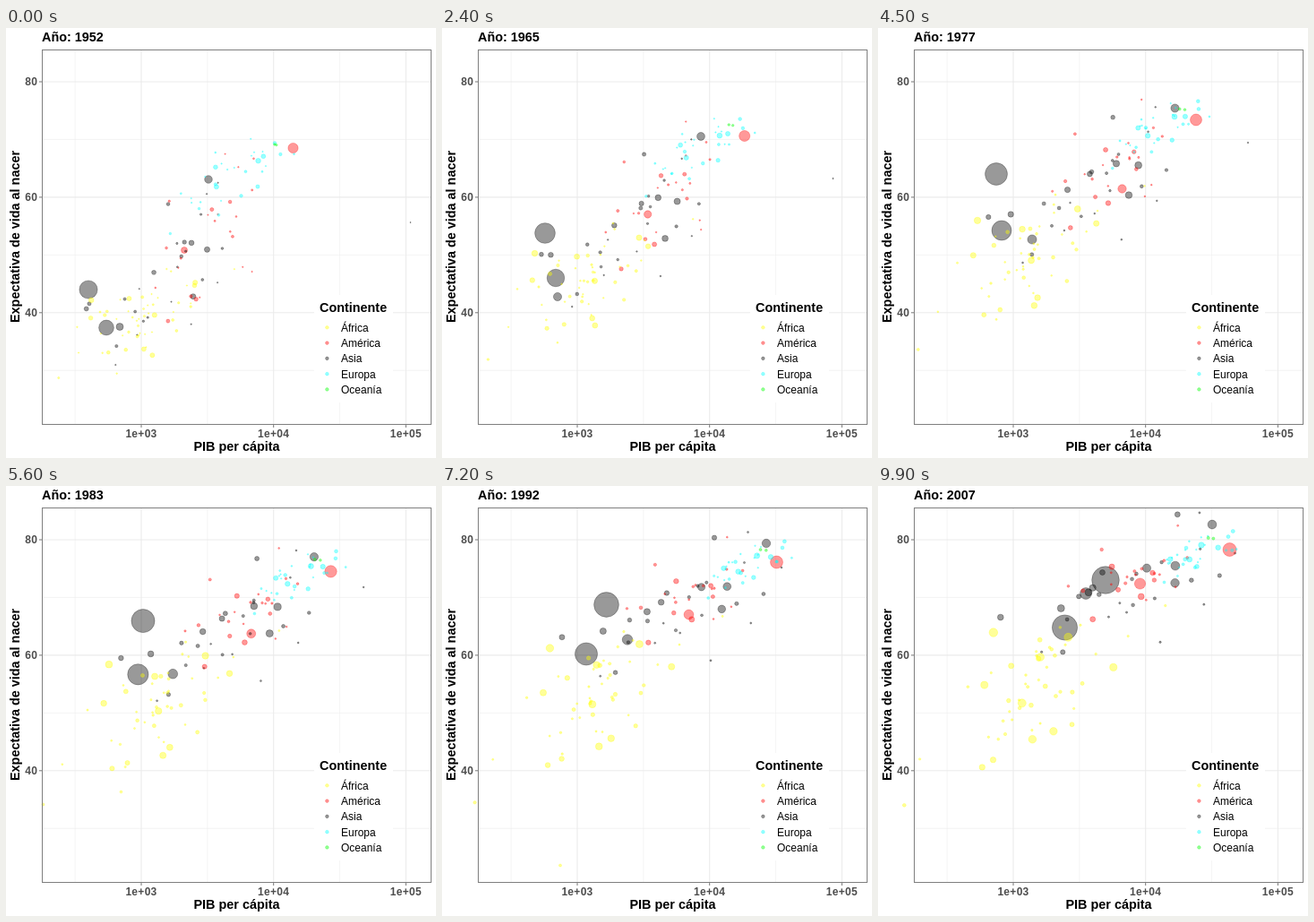
These frames come from a looping animation (480x480 px, 10000 ms). An HTML page:

```html
<!DOCTYPE html>
<html lang="es">
<head>
<meta charset="utf-8">
<title>Expectativa de vida y PIB</title>
<style>
  html, body { margin: 0; width: 100%; height: 100%; overflow: hidden; background: #fff; }
  svg { display: block; width: 480px; height: 480px; font: 12px "Liberation Sans", Arial, sans-serif; }
  .title { font-size: 14.4px; font-weight: bold; }
  .tick { font-weight: bold; fill: #4d4d4d; letter-spacing: 0.3px; }
</style>
</head>
<body>
<svg id="stage" viewBox="0 0 480 480"></svg>
<script>
const stage = document.getElementById('stage');
const YELLOW = '#ffff00', RED = '#ff0000', BLACK = '#000000', CYAN = '#00ffff', GREEN = '#00ff00';
const GRID = '#ebebeb', MARK = '#777777';
const FRAMES = 100, FRAME_MS = 100, FIRST_YEAR = 1952, SPAN = 55;

const px = logGdp => 151 + (logGdp - 3) * 147.7;
const py = life => 60 + (80 - life) * 6.445;
const mix = (a, b, k) => a + (b - a) * k;
const easeOut = (k, power) => 1 - (1 - k) ** power;

function add(tag, attrs, text) {
  const el = document.createElementNS('http://www.w3.org/2000/svg', tag);
  for (const key in attrs) el.setAttribute(key, attrs[key]);
  if (text) el.textContent = text;
  stage.append(el);
  return el;
}

function line(x1, y1, x2, y2, stroke, width) {
  add('line', { x1, y1, x2, y2, stroke, 'stroke-width': width });
}

function circle(color, cx, cy, r) {
  return add('circle', {
    cx, cy, r, fill: color, stroke: color,
    'fill-opacity': 0.4, 'stroke-opacity': 0.4, 'stroke-width': 0.7
  });
}

// Panel grid, minor lines first
for (const g of [2.5, 3.5, 4.5]) line(px(g), 24, px(g), 442, GRID, 0.53);
for (const l of [30, 50, 70]) line(40, py(l), 475, py(l), GRID, 0.53);
for (const g of [3, 4, 5]) {
  const x = px(g);
  line(x, 24, x, 442, GRID, 1.07);
  line(x, 442, x, 446, MARK, 1);
  add('text', { x, y: 457, class: 'tick', 'text-anchor': 'middle' }, '1e+0' + g);
}
for (const l of [40, 60, 80]) {
  const y = py(l);
  line(40, y, 475, y, GRID, 1.07);
  line(37, y, 40, y, MARK, 1);
  add('text', { x: 35.3, y: Math.round(y + 4), class: 'tick', 'text-anchor': 'end' }, l);
}

let seed = 29;
function random() {
  seed = (seed * 1664525 + 1013904223) % 4294967296;
  return seed / 4294967296;
}
const bell = () => (random() + random() + random() - 1.5) * 2;

// Every bubble has a place(k) giving [x, y] for loop progress k from 0 to 1.
const bubbles = [];
function bubble(color, r0, r1, place) {
  bubbles.push({ el: circle(color, 0, 0, r0), r0, r1, place });
}

// A large bubble passes through five points on the stage.
const KNOTS = [0, 40 / 3, 25, 40, 55].map(years => years / SPAN);
function leader(color, r0, r1, ...points) {
  bubble(color, r0, r1, k => {
    let i = 0;
    while (i < KNOTS.length - 2 && k > KNOTS[i + 1]) i++;
    const part = (k - KNOTS[i]) / (KNOTS[i + 1] - KNOTS[i]);
    return points[i].map((v, axis) => mix(v, points[i + 1][axis], part));
  });
}

// A continent's crowd drifts from one bell-shaped spread to another;
// richer countries tend to live longer.
function crowd(color, count, { size, growth, power, from, to }) {
  const standing = () => {
    const wealth = bell();
    return [wealth, 0.6 * wealth + 0.8 * bell()];
  };
  for (let i = 0; i < count; i++) {
    const first = standing();
    const last = standing().map((v, axis) => 0.85 * first[axis] + 0.5 * v);
    const r = 0.7 + size * random() ** 3;
    bubble(color, r, r * growth, k => {
      const e = easeOut(k, power);
      const value = (key, axis) => mix(from[key], to[key], e) +
        mix(from[key + 'Spread'], to[key + 'Spread'], e) * mix(first[axis], last[axis], k);
      return [px(value('gdp', 0)), py(value('life', 1))];
    });
  }
}

leader(BLACK, 10.1, 15.3, [92, 292], [115, 229], [132, 163], [183.5, 132.5], [254, 105]);
leader(BLACK, 8.4, 14.1, [112, 334.5], [127, 279], [138, 226], [161, 187.5], [208.5, 158]);
leader(BLACK, 4.3, 4.9, [226, 169], [289, 121], [331.5, 89.5], [362, 64], [373, 43]);
leader(BLACK, 4, 6.4, [127, 333.5], [129, 300], [172, 236], [207, 171.5], [232, 120]);
leader(BLACK, 0.6, 1.1, [451.5, 217], [436.5, 168], [413, 128], [379, 91], [398.5, 75]);
leader(RED, 5.6, 7.5, [320.5, 134], [337.7, 120.5], [355, 102.5], [373.5, 85], [392.5, 71]);
leader(RED, 3.5, 6.1, [199, 248], [229.7, 208], [272.5, 179.5], [275.5, 143.5], [292.5, 109]);
leader(YELLOW, 1.1, 1.7, [105, 317], [108, 289], [126, 285], [132, 423.5], [142, 277]);

crowd(BLACK, 28, {
  size: 2.6, growth: 1.6, power: 1.5,
  from: { gdp: 3.18, gdpSpread: 0.3, life: 46, lifeSpread: 7.5 },
  to: { gdp: 3.85, gdpSpread: 0.42, life: 71, lifeSpread: 5 }
});
crowd(RED, 23, {
  size: 2, growth: 1.5, power: 1.5,
  from: { gdp: 3.5, gdpSpread: 0.18, life: 53, lifeSpread: 8 },
  to: { gdp: 3.92, gdpSpread: 0.22, life: 74, lifeSpread: 3 }
});
crowd(CYAN, 30, {
  size: 2.8, growth: 1.15, power: 1.5,
  from: { gdp: 3.72, gdpSpread: 0.22, life: 65, lifeSpread: 4.5 },
  to: { gdp: 4.4, gdpSpread: 0.19, life: 78, lifeSpread: 2.4 }
});
crowd(GREEN, 2, {
  size: 1, growth: 1.3, power: 1.3,
  from: { gdp: 4.01, gdpSpread: 0.01, life: 69.2, lifeSpread: 0.2 },
  to: { gdp: 4.47, gdpSpread: 0.06, life: 80.7, lifeSpread: 0.5 }
});
crowd(YELLOW, 51, {
  size: 2.2, growth: 1.7, power: 2,
  from: { gdp: 3, gdpSpread: 0.27, life: 39, lifeSpread: 4.5 },
  to: { gdp: 3.15, gdpSpread: 0.35, life: 54, lifeSpread: 7 }
});

// Frame and legend
add('rect', { x: 40.5, y: 24.5, width: 434, height: 418, fill: 'none', stroke: '#7f7f7f' });
add('rect', { x: 344, y: 298, width: 88, height: 120, fill: '#fff' });
add('text', { x: 350, y: 317, class: 'title' }, 'Continente');
[['África', YELLOW], ['América', RED], ['Asia', BLACK], ['Europa', CYAN], ['Oceanía', GREEN]]
  .forEach(([name, color], i) => {
    const y = 334.3 + i * 17.28;
    circle(color, 358.4, y, 1.8);
    add('text', { x: 374, y: Math.round(y + 4.5) }, name);
  });

add('text', { x: 257.5, y: 472, class: 'title', 'text-anchor': 'middle' }, 'PIB per cápita');
add('text', { transform: 'translate(15 233) rotate(-90)', class: 'title', 'text-anchor': 'middle' },
  'Expectativa de vida al nacer');
const heading = add('text', { x: 40, y: 15, class: 'title' }, 'Año: 1952');

function draw(frame) {
  const k = frame / (FRAMES - 1);
  heading.textContent = 'Año: ' + Math.round(FIRST_YEAR + SPAN * k);
  for (const { el, r0, r1, place } of bubbles) {
    const [x, y] = place(k);
    el.setAttribute('cx', x.toFixed(2));
    el.setAttribute('cy', y.toFixed(2));
    el.setAttribute('r', mix(r0, r1, k).toFixed(2));
  }
}

let shown = 0;
const start = performance.now();
function tick() {
  const frame = Math.floor(Math.max(0, performance.now() - start) / FRAME_MS) % FRAMES;
  if (frame !== shown) draw(shown = frame);
  requestAnimationFrame(tick);
}
draw(0);
requestAnimationFrame(tick);
</script>
</body>
</html>
```
